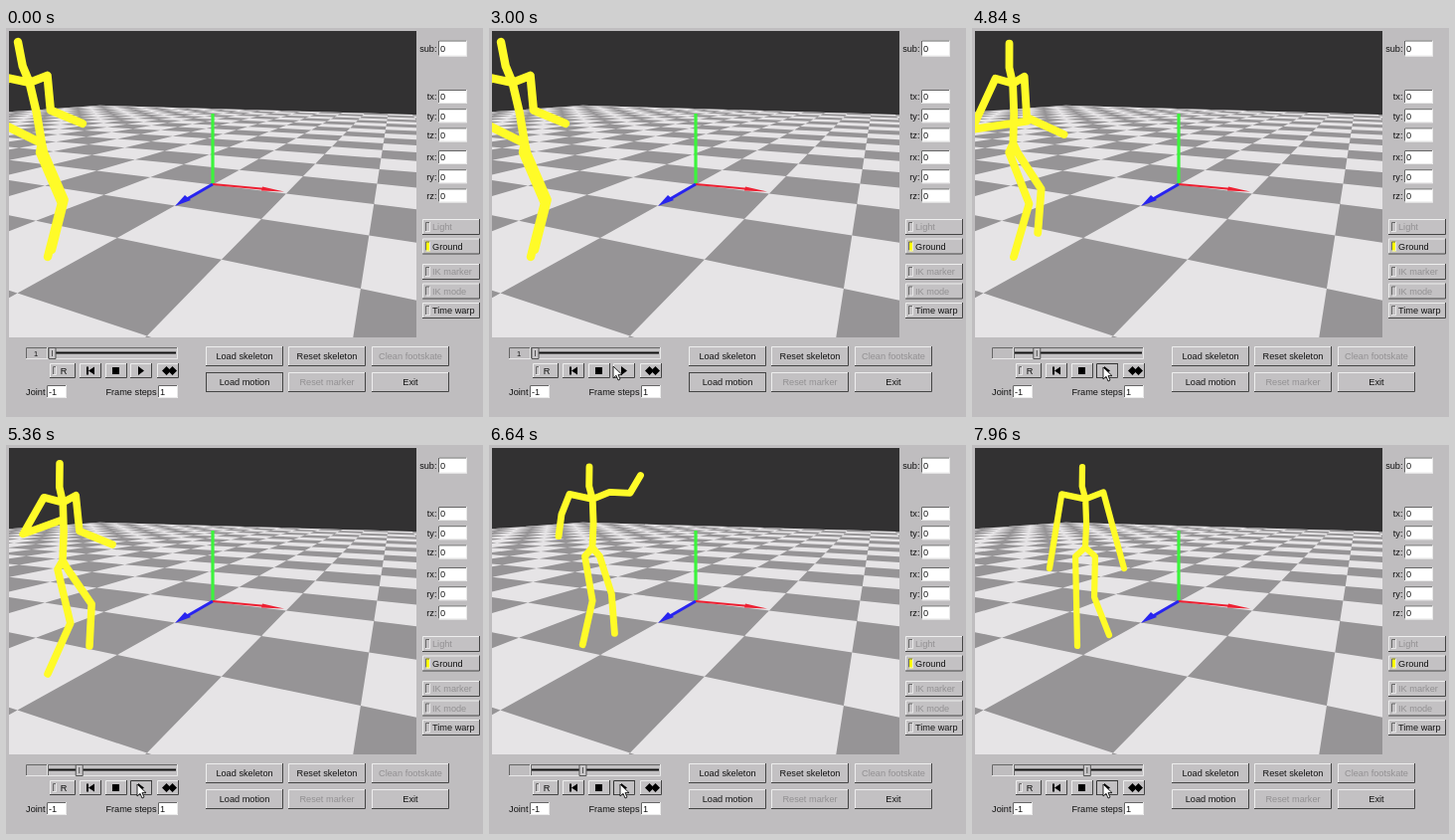
These frames come from a looping animation (480x391 px, 8000 ms). An HTML page:

```html
<!DOCTYPE html>
<html lang="en">
<head>
<meta charset="utf-8">
<title>Motion viewer</title>
<style>
html, body { margin: 0; width: 100%; height: 100%; overflow: hidden; background: #bfbdbf; }
svg { display: block; width: 480px; height: 391px; }
text { font: 9.2px "Liberation Sans", Arial, sans-serif; white-space: pre; }
</style>
</head>
<body>
<svg id="stage" viewBox="0 0 480 391">
  <defs><clipPath id="view"><rect x="3" y="3" width="410" height="308"/></clipPath></defs>
  <rect width="480" height="391" fill="#bfbdbf"/>
  <g clip-path="url(#view)">
    <rect x="3" y="3" width="410" height="308" fill="#323132"/>
    <path id="ground" fill="#e6e4e6"/>
    <path id="tiles" fill="#969496"/>
    <path d="M208 157V86" stroke="#3cf43c" stroke-width="3.2"/>
    <path d="M208 157L262 162" stroke="#ee2032" stroke-width="2"/>
    <path d="M280 164.5l-22-5-1 4z" fill="#ee2032"/>
    <path d="M208 157L182 172" stroke="#2824f0" stroke-width="3"/>
    <path d="M170 179l10-11 6 5z" fill="#2824f0"/>
    <path id="skeleton" fill="none" stroke="#fffb28" stroke-linejoin="round" stroke-linecap="round"/>
  </g>
  <g id="panel"></g>
  <path id="cursor" d="M0 0V12L3 9.3 5 14 7 13 5 8.6H9Z" fill="#fff" stroke="#111" stroke-width=".9"/>
</svg>
<script>
const LOOP = 8000, PLAY = 3680;
const $ = id => document.getElementById(id);
const panel = $("panel");
const mix = (a, b, s) => a + (b - a) * s;
const glide = (t, from, to) => {
  const s = Math.min(1, Math.max(0, (t - from) / (to - from)));
  return s * s * (3 - 2 * s);
};
const polyline = points => "M" + points.map(p => p.map(n => n.toFixed(2)).join(" ")).join("L");

function add(tag, attrs, content) {
  const node = document.createElementNS("http://www.w3.org/2000/svg", tag);
  for (const key in attrs) node.setAttribute(key, attrs[key]);
  if (content !== undefined) node.textContent = content;
  panel.append(node);
  return node;
}

// Ground plane seen by a level camera: u runs along the red axis, v along the blue one.
const HORIZON = 57, VANISH_U = -625, VANISH_V = 389, HALF = 15;
const depth = (u, v) => 1 - .0815 * u - .1735 * v;
function project([u, v]) {
  const w = depth(u, v);
  return [(208 - .0815 * u * VANISH_U - .1735 * v * VANISH_V) / w, HORIZON + 100.5 / w];
}
function drawGround() {
  let light = "", dark = "";
  for (let u = -HALF; u < HALF; u++) for (let v = -HALF; v < HALF; v++) {
    if (depth(u + 1, v + 1) < .04) continue;
    const quad = polyline([[u, v], [u + 1, v], [u + 1, v + 1], [u, v + 1]].map(project)) + "Z";
    light += quad;
    if ((u + v) % 2 === 0) dark += quad;
  }
  $("ground").setAttribute("d", light);
  $("tiles").setAttribute("d", dark);
}
drawGround();

// Control panel
function bevel(x, y, w, h, fill = "#c3c1c3", sunken = false) {
  const [a, b] = sunken ? ["#666", "#e8e8e8"] : ["#eee", "#444"];
  add("rect", { x, y, width: w, height: h, fill });
  add("path", { d: `M${x + .5} ${y + h}V${y + .5}H${x + w}`, fill: "none", stroke: a });
  add("path", { d: `M${x + w - .5} ${y}V${y + h - .5}H${x}`, fill: "none", stroke: b });
}
function label(text, x, y, anchor = "start", fill = "#111") {
  return add("text", { x, y: y + 3.4, "text-anchor": anchor, fill }, text);
}
function field(name, value, x, y, w, h = 14) {
  label(name, x - 1.5, y, "end");
  bevel(x, y - h / 2, w, h, "#fff", true);
  label(value, x + 2, y);
}
function button(text, x, y, enabled = true) {
  bevel(x, y, 78, 20);
  label(text, x + 39, y + 10, "middle", enabled ? "#111" : "#929092");
}
function toggle(text, y, enabled, lamp = "#c3c1c3") {
  bevel(419, y - 8, 58, 16);
  bevel(422, y - 5, 5, 10, lamp, true);
  label(text, 429, y, "start", enabled ? "#111" : "#929092");
}

field("sub:", "0", 435, 20.5, 29, 16);
["tx:", "ty:", "tz:", "rx:", "ry:", "rz:"].forEach((name, i) =>
  field(name, "0", 435, 69 + 19.2 * i + (i > 2 ? 3.4 : 0), 29));
toggle("Light", 200, false);
toggle("Ground", 219.5, true, "#ffff00");
toggle("IK marker", 245, false);
toggle("IK mode", 264.5, false);
toggle("Time warp", 284, true);

button("Load skeleton", 201, 320);
button("Reset skeleton", 284, 320);
button("Clean footskate", 368, 320, false);
button("Load motion", 201, 346);
button("Reset marker", 284, 346, false);
button("Exit", 368, 346);
const focus = add("rect", { x: 201.5, y: 346.5, width: 77, height: 19, fill: "none", stroke: "#444" });

bevel(20, 321, 22, 12, "#bfbdbf", true);
const counter = label("1", 30, 327, "middle");
counter.style.fontSize = "7.5px";
bevel(42, 321, 131, 12, "#c3c1c3", true);
add("path", { d: "M43 326.5H171", stroke: "#111", "stroke-width": 2 });
const handle = add("path", { d: "M-3.5 321.5H3.5V332.5H-3.5Z M0 324V330", fill: "#c9c7c9", stroke: "#555" });

bevel(44, 337, 26, 15);
bevel(47, 340, 4, 9, "#c3c1c3", true);
label("R", 58, 344.5, "middle");
[74, 100, 125, 152].forEach(x => bevel(x, 337, 22, 15));
add("path", { d: "M81 340.5h2v8h-2z M89 340.5v8l-6-4z M107 341h7v7h-7z M133 340v9l6-4.5z M157 344.5l4.5-4.5 3 3 3-3 4.5 4.5-4.5 4.5-3-3-3 3z" });
const pressed = add("path", { d: "M125.5 352V337.5H147", fill: "none", stroke: "#333" });
field("Joint", "-1", 41, 365.5, 20, 13);
field("Frame steps", "1", 153, 365.5, 20, 13);

// Smooth curve through values at the key times, at rest at both ends.
const keyTimes = [PLAY, 4280, 5360, 6160, 7240, 7960];
function curve(t, values) {
  const last = keyTimes.length - 1;
  if (t <= PLAY) return values[0];
  if (t >= keyTimes[last]) return values[last];
  const k = keyTimes.findIndex(key => key > t) - 1;
  const slope = j => j === 0 || j === last ? 0
    : (values[j + 1] - values[j - 1]) / (keyTimes[j + 1] - keyTimes[j - 1]);
  const span = keyTimes[k + 1] - keyTimes[k], s = (t - keyTimes[k]) / span;
  return mix(values[k], values[k + 1], s * s * (3 - 2 * s))
    + span * s * (1 - s) * ((1 - s) * slope(k) - s * slope(k + 1));
}

// A foot rests where it stands and is lifted a little during each step.
function foot(t, [x, y], steps) {
  for (const [from, to, nextX, nextY] of steps) {
    const s = glide(t, from, to);
    [x, y] = [mix(x, nextX, s), mix(y, nextY, s) - 6 * Math.sin(Math.PI * s)];
  }
  return [x, y];
}

// Two bones with the middle joint pushed sideways by a share of the limb's length.
function limb(from, to, bend) {
  const dx = to[0] - from[0], dy = to[1] - from[1];
  return [from, [from[0] + dx / 2 + bend * dy, from[1] + dy / 2 - bend * dx], to];
}

function drawSkeleton(t) {
  const progress = Math.max(0, (t - PLAY) / (LOOP - PLAY));
  const relax = glide(t, 7240, 7960), straighten = glide(t, 6160, 7240);

  const head = [curve(t, [12, 22, 54, 84, 117, 111]), mix(14, 22, glide(t, 4280, 6160))];
  const pelvis = [head[0] + mix(24, 3, glide(t, PLAY, 5000)), mix(116, 103, glide(t, 5360, 6500))];
  const along = s => [mix(head[0], pelvis[0], s), mix(head[1], pelvis[1], s)];
  const neck = along(.4);
  neck[0] += 2;
  const throat = along(.24);
  throat[0] -= 1;
  const spine = along(.7);
  spine[0] += 2;

  const width = curve(t, [21, 15, 16, 23, 16, 21]);
  const shoulder = side => [neck[0] - 3 + side * width, neck[1] - 6 - side];
  const leftHand = [curve(t, [36, 51, 57, 54, 90, 78]), curve(t, [116, 117, 75, 91, 94, 124])];
  const rightHand = [curve(t, [77, 81, 107, 142, 159, 153]), curve(t, [96, 104, 100, 39, 43, 124])];
  const leftElbow = curve(t, [-.35, -.3, -1.37, -.53, .35, 0]);

  const hip = side => [pelvis[0] + side * (2 + 8 * progress), pelvis[1] + 9];
  const leftFoot = foot(t, [42, 230], [[5400, 6000, 94, 201], [6600, 7100, 106, 202]]);
  const rightFoot = foot(t, [46, 223],
    [[4450, 5200, 84, 202], [5700, 6150, 116, 199], [6400, 6900, 138, 191]]);

  const chains = [
    [head, throat, neck, spine, pelvis],
    [neck, ...limb(shoulder(-1), leftHand, leftElbow)],
    [neck, ...limb(shoulder(1), rightHand, mix(-.3, 0, relax))],
    [pelvis, ...limb(hip(-1), leftFoot, mix(.17, 0, straighten))],
    [pelvis, ...limb(hip(1), rightFoot, mix(.17, -.1, straighten))],
  ];
  $("skeleton").setAttribute("d", chains.map(polyline).join(""));
  $("skeleton").setAttribute("stroke-width", 8.4 - 2.2 * progress);
}

function render(t) {
  const playing = t >= PLAY;
  drawSkeleton(t);
  handle.setAttribute("transform", `translate(${46.5 + Math.max(0, t - PLAY) * .0162} 0)`);
  counter.style.display = focus.style.display = playing ? "none" : "";
  pressed.style.display = playing ? "" : "none";
  const arrive = glide(t, 1500, 2500), settle = glide(t, 3050, 3500);
  $("cursor").setAttribute("transform",
    `translate(${240 - 115 * arrive + 7 * settle} ${392 - 52 * arrive + settle})`);
}

const start = performance.now();
function tick() {
  render((performance.now() - start) % LOOP);
  requestAnimationFrame(tick);
}
tick();
</script>
</body>
</html>
```
